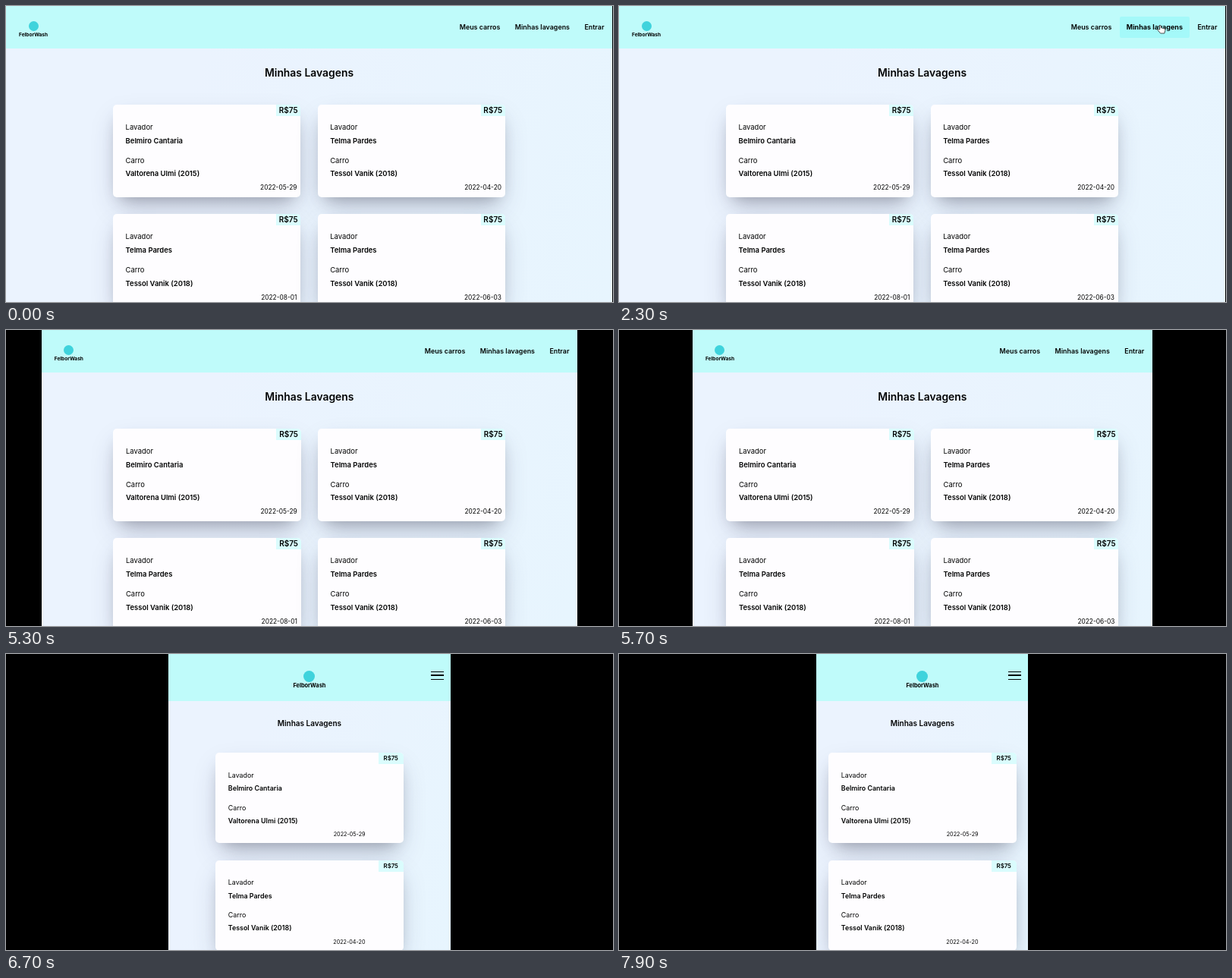
Write an HTML page that moves like this. It is 800x390 px and loops after 8 s.

```html
<!DOCTYPE html>
<html lang="pt-BR">
<head>
<meta charset="utf-8">
<title>Minhas Lavagens</title>
<style>
  html, body { margin: 0; width: 100%; height: 100%; overflow: hidden; background: #000; }
  body { position: relative; font: 600 9.44px/20px Inter, "Liberation Sans", sans-serif; color: #020303; }
  #page { position: absolute; top: 0; height: 390px; overflow: hidden;
    background: linear-gradient(110deg, #ebf3fe 30%, #e7f5fe); }
  #page *, #cursor { position: absolute; white-space: nowrap; }

  header { left: 0; right: 0; top: 0; height: 56px; background: #bffbfa; }
  #mark { left: 29.5px; top: 20px; width: 13px; height: 13px; border-radius: 50%; background: #3fd3dc; }
  #brand { left: 17px; top: 27.5px; font-size: 6.55px; font-weight: 700; }
  nav { right: 1.7px; top: 14px; display: flex; gap: 1.7px; font-size: 8.89px; line-height: 27.5px; }
  #page nav a { position: static; padding: 0 8.9px; border-radius: 2px; }
  nav a.on { background: #a4f9f9; font-size: 9px; font-weight: 700; }
  #menu { display: none; right: 9px; top: 23px; width: 17px; height: 8.6px;
    border: solid #020303; border-width: 1.8px 0; }
  #menu::after { content: ""; position: absolute; left: 0; right: 0; top: 3.4px; height: 1.8px; background: #020303; }

  h1 { left: 0; right: 0; top: 77.5px; margin: 0; text-align: center; font-size: 13.89px; font-weight: 600; }

  .card { width: 247.4px; height: 122px; border-radius: 5px; background: #fefdff;
    box-shadow: 0 16.7px 33.3px -6.7px rgba(50,50,93,.25), 0 10px 20px -10px rgba(0,0,0,.3); }
  .card * { left: 16.6px; }
  .card .price { left: auto; right: 0; top: 0; padding: 0 3.8px 1px; line-height: 14px;
    font-size: 10px; background: #dafcfd; border-radius: 0 5px 0 0; }
  .label { font-weight: 400; }
  .l1 { top: 20.4px; } .v1 { top: 38px; } .l2 { top: 64.2px; } .v2 { top: 81.8px; }
  .card .date { left: auto; right: 5px; top: 99.7px; font-size: 8.33px; font-weight: 400; }

  .mobile header { height: 62px; }
  .mobile nav { display: none; }
  .mobile #menu { display: block; }
  .mobile #mark { left: calc(50% - 7.5px); top: 22px; width: 15px; height: 15px; }
  .mobile #brand { left: 0; right: 0; top: 32px; text-align: center; font-size: 7.4px; }
  .mobile h1 { top: 81px; font-size: 10px; }
  .mobile .card { height: 119px; font-size: 8.89px; }
  .mobile .card .price { padding: 0 6.7px 1px; font-size: 7.78px; }
  .mobile .l1 { top: 19.6px; } .mobile .v1 { top: 36.9px; }
  .mobile .l2 { top: 62.5px; } .mobile .v2 { top: 79.6px; }
  .mobile .card .date { right: 50px; top: 98px; font-size: 7.22px; }

  #cursor { width: 12px; height: 14px; overflow: visible; stroke-width: .8; stroke-linejoin: round; }
</style>
</head>
<body>
<div id="page">
  <header>
    <i id="mark"></i>
    <b id="brand">FelborWash</b>
    <nav><a>Meus carros</a><a>Minhas lavagens</a><a>Entrar</a></nav>
    <i id="menu"></i>
  </header>
  <h1>Minhas Lavagens</h1>
</div>
<svg id="cursor">
  <path id="arrow" d="M0 0V10.5L2.5 8.2L4.1 11.8L5.8 11L4.2 7.5H7.5Z" fill="#000" stroke="#fff"/>
  <path id="hand" d="M-1 1Q0-1 1 1L1.6 4Q3 3.2 3.6 4.4Q5 3.8 5.4 5Q7 4.8 7 6.4L6.4 9L5.8 11H0.6L-3.2 6.4Q-2.6 4.8-.2 6Z" fill="#fff" stroke="#222"/>
</svg>
<script>
const $ = id => document.getElementById(id);
const page = $("page"), cursor = $("cursor");
const links = [...document.querySelectorAll("nav a")];

const washes = [
  ["Belmiro Cantaria", "Valtorena Ulmi (2015)", "2022-05-29"],
  ["Telma Pardes", "Tessol Vanik (2018)", "2022-04-20"],
  ["Telma Pardes", "Tessol Vanik (2018)", "2022-08-01"],
  ["Telma Pardes", "Tessol Vanik (2018)", "2022-06-03"]
];
const cards = washes.map(([washer, car, date]) => {
  const card = document.createElement("div");
  card.className = "card";
  card.innerHTML = `<span class="price">R$75</span>
    <span class="label l1">Lavador</span><span class="v1">${washer}</span>
    <span class="label l2">Carro</span><span class="v2">${car}</span>
    <span class="date">${date}</span>`;
  page.append(card);
  return card;
});

// [time, value, ...] keys, linear in between
const edgeKeys = [[5000, 0], [5300, 46.8], [5900, 122], [6100, 147.8], [6700, 214],
  [6800, 225], [7100, 245], [7400, 257], [7600, 260], [7900, 260.3]];
const mouseKeys = [[1000, 560, 345], [1400, 620, 52], [1600, 620, 52], [1900, 624, 28],
  [2100, 682, 27], [2300, 713, 25], [2400, 716, 26], [2700, 775, 27], [3000, 777, 28],
  [3300, 777, 28], [3700, 784, 42], [4100, 800, 62]];

function at(keys, t) {
  const i = keys.findIndex(k => k[0] > t);
  if (i === 0) return keys[0].slice(1);
  if (i < 0) return keys[keys.length - 1].slice(1);
  const a = keys[i - 1], b = keys[i], p = (t - a[0]) / (b[0] - a[0]);
  return a.slice(1).map((v, j) => v + (b[j + 1] - v) * p);
}

function layout(t) {
  const [left] = at(edgeKeys, t);
  const width = Math.min(799, 799.8 - 2 * left);
  const mobile = width < 427, cols = width < 540 ? 1 : 2;
  page.style.left = left + "px";
  page.style.width = width + "px";
  page.className = mobile ? "mobile" : "";
  const top = mobile ? 130.4 : 129.6, step = mobile ? 141.3 : 144.3;
  cards.forEach((card, i) => {
    const x = width / 2 + (i % cols) * 269.6 - (cols === 2 ? 258.5 : 123.7);
    card.style.left = x + "px";
    card.style.top = top + Math.floor(i / cols) * step + "px";
  });
}

function point(t) {
  const shown = t >= 1000 && t < 4100;
  const [x, y] = at(mouseKeys, t);
  const inBar = shown && y > 14 && y < 41.5 && x > 589;
  const hover = !inBar ? -1 : x < 660 ? 0 : x < 752 ? 1 : 2;
  links.forEach((a, i) => a.classList.toggle("on", i === hover));
  cursor.style.display = shown ? "" : "none";
  cursor.style.left = x + "px";
  cursor.style.top = y + "px";
  $("hand").style.display = hover < 0 ? "none" : "";
  $("arrow").style.display = hover < 0 ? "" : "none";
}

function draw() {
  const t = Math.floor(performance.now() % 8000 / 100) * 100;
  layout(t);
  point(t);
  requestAnimationFrame(draw);
}
draw();
</script>
</body>
</html>
```
